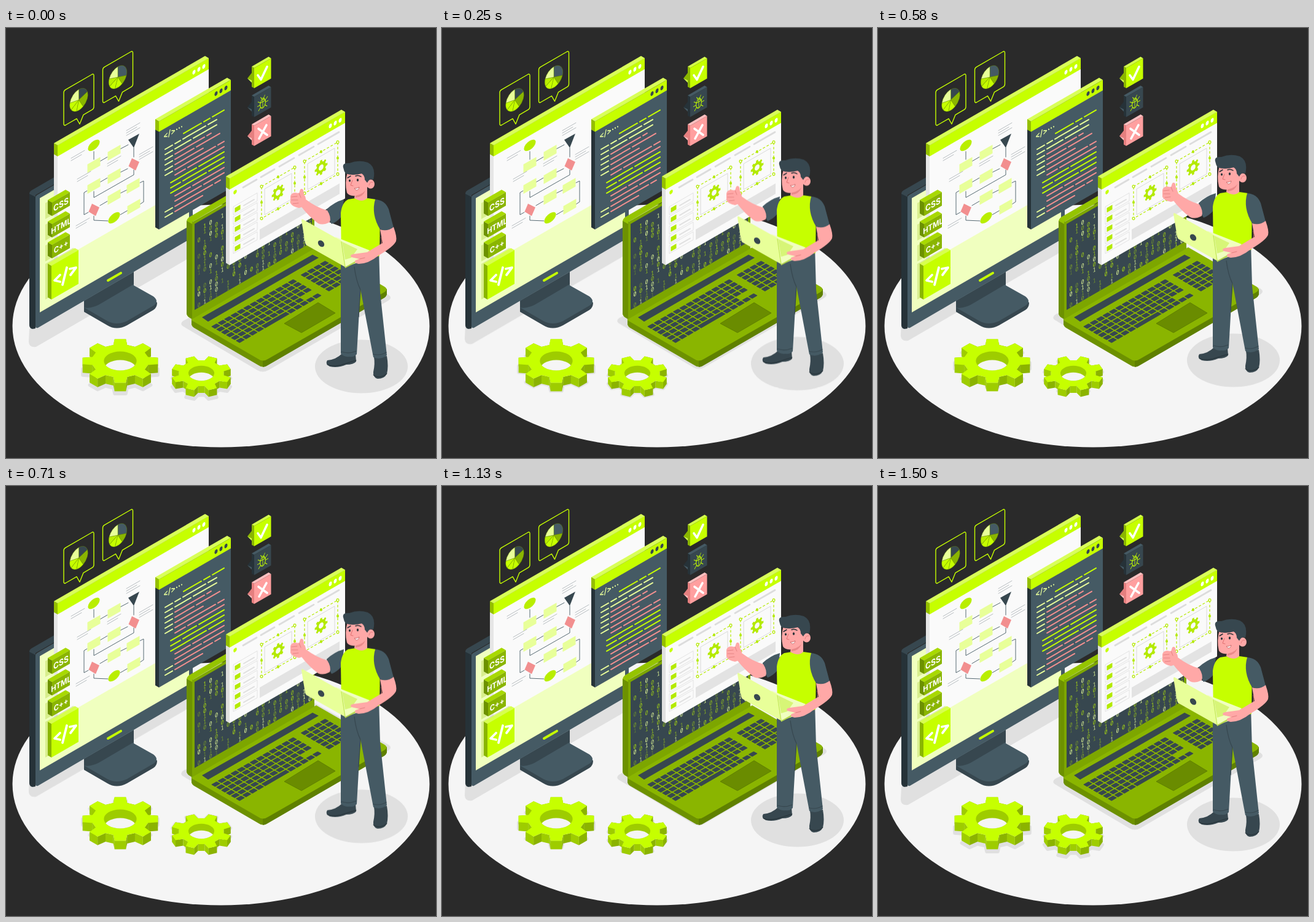
Recreate the animation shown at these times as an HTML page. Size 700x700 px, loop 1.54 s.

```html
<!DOCTYPE html>
<html lang="en">
<head>
<meta charset="utf-8">
<title>Isometric developer scene</title>
<style>
html, body { margin: 0; width: 100%; height: 100%; overflow: hidden; background: #2a2a2a; }
svg { display: block; width: 100%; height: 100%; }
.float { animation: float 1540ms infinite; }
@keyframes float {
  0% { transform: translateY(0); animation-timing-function: steps(18, end); }
  48.7% { transform: translateY(-14px); animation-timing-function: steps(18, end); }
  97.4%, 100% { transform: translateY(0); }
}
text { font-family: Inter, sans-serif; font-weight: 700; text-anchor: middle; }
.bits text { font: 10px "Noto Sans Mono", monospace; }
</style>
</head>
<body>
<svg id="stage" viewBox="0 0 700 700"></svg>
<script>
const K = 0.577;
const LIME = '#c6ff00', OLIVE = '#8ab500', MOSS = '#6d9100', PALE = '#e8ff99', MIST = '#f0ffbf',
  SLATE = '#455a64', DARK = '#37474f', NIGHT = '#263238', SKIN = '#ffa8a7', ROSE = '#f28f8f',
  SHADE = '#e0e0e0', WHITE = '#fafafa';

const poly = (pts, fill, extra = '') => `<polygon points="${pts}" fill="${fill}" ${extra}/>`;
const path = (d, fill, extra = '') => `<path d="${d}" fill="${fill}" ${extra}/>`;
const stroke = (d, color, w = 1, extra = '') =>
  path(d, 'none', `stroke="${color}" stroke-width="${w}" stroke-linecap="round" stroke-linejoin="round" ${extra}`);
const oval = (x, y, rx, ry, fill, extra = '') =>
  `<ellipse cx="${x}" cy="${y}" rx="${rx}" ry="${ry}" fill="${fill}" ${extra}/>`;
const range = (n, fn) => Array.from({ length: n }, (_, i) => fn(i)).join('');

// Shapes on the wall plane, rising to the right
const wall = (x, y, body) => `<g transform="matrix(.866 -.5 0 1 ${x} ${y})">${body}</g>`;
const quad = (x, y, w, h, fill, extra) =>
  poly([x, y, x + w, y - K * w, x + w, y - K * w + h, x, y + h], fill, extra);
const rise = (x, y, w, color, width = 1) => stroke(`M${x} ${y}l${w} ${-K * w}`, color, width);
const slab = (x, y, w, h, d, front, side, top) =>
  poly([x, y, x - d, y - K * d, x - d, y - K * d + h, x, y + h], side) +
  poly([x, y, x + w, y - K * w, x + w - d, y - K * (w + d), x - d, y - K * d], top) +
  quad(x, y, w, h, front);
const label = (x, y, s, size, fill = '#fff') =>
  wall(x, y, `<text font-size="${size}" y="${size * 0.36}" fill="${fill}">${s}</text>`);

function pane(x, y, w, h, bar, face, side, dots) {
  const dot = i => wall(x + w - 8 - i * 8, y + bar * 0.5 - K * (w - 8 - i * 8), oval(0, 0, 2.9, 3.5, dots));
  return slab(x, y, w, h, 6, face, side, '#d9ff59') +
    poly([x, y, x - 6, y - 3.5, x - 6, y + bar - 3.5, x, y + bar], '#95bf00') +
    quad(x, y, w, bar, LIME) + range(3, dot);
}

function cog(cx, cy, r, teeth, turn, squash = K) {
  const pts = [], step = 2 * Math.PI / teeth;
  for (let i = 0; i < teeth; i++) {
    for (const [a, q] of [[-0.31, 0.75], [-0.19, 1], [0.19, 1], [0.31, 0.75]]) {
      const t = turn + (i + a) * step;
      pts.push([cx + r * q * Math.cos(t), cy + r * q * squash * Math.sin(t)]);
    }
  }
  return pts;
}
const shift = (pts, dy) => pts.map(([x, y]) => [x, y + dy]);

function gear(cx, cy, r, depth, turn) {
  const pts = cog(cx, cy, r, 8, turn);
  const sides = pts.map((p, i) => [p, pts[(i + 1) % pts.length]])
    .sort((a, b) => a[0][1] + a[1][1] - b[0][1] - b[1][1])
    .map(([a, b]) => poly([a, b, [b[0], b[1] + depth], [a[0], a[1] + depth]],
      b[1] > a[1] + 1 ? '#8bb300' : '#9ecc00'));
  const rx = r * 0.43, ry = rx * K, id = 'hole' + r;
  return sides.join('') + poly(pts, LIME) +
    `<clipPath id="${id}">${oval(cx, cy, rx, ry, '#000')}</clipPath>` +
    oval(cx, cy, rx, ry, '#9ecc00') +
    oval(cx, cy + depth, rx, ry, '#f5f5f5', `clip-path="url(#${id})"`);
}
const gearShadow = (cx, cy, r, depth, turn) =>
  poly(shift(cog(cx, cy, r, 8, turn), depth + 4), SHADE, `stroke="${SHADE}" stroke-width="5" stroke-linejoin="round"`);

const shadows = () =>
  path('M37 511Q38 521 49 519L304 371V335L38 490Z', SHADE) +
  path('M288 477Q282 482 289 486L409 557Q418 562 427 557L622 444Q630 439 622 434L500 365Z', SHADE) +
  gearShadow(186, 542, 62, 14, 0) + gearShadow(318, 562, 49, 11, Math.PI / 8) +
  oval(578.5, 551, 75.5, 43.5, SHADE);

const stand = () =>
  path('M127 445V462L165 484Q180 493 197 484L240 459Q246 455 246 447L208 420Z', DARK) +
  path('M127 444V455L165 477Q180 485 197 477L240 452Q250 445 240 437L208 419V397Z', SLATE) +
  path('M127 444L208 397V417L157 447Q140 458 127 455Z', DARK);

const monitor = () =>
  path('M38 270Q38 266 42 264L300 115L305 124L48 272V489L43 490Q38 489 38 483Z', DARK) +
  path('M38 270L48 275V489Q38 491 38 482Z', NIGHT) +
  path('M48 276Q48 273 52 271L304 124V341L52 488Q48 489 48 486Z', SLATE) +
  quad(55, 277, 243, 186, MIST) +
  rise(166, 411, 21, LIME, 4);

function bubble(x, y, slices) {
  let at = 0;
  const point = t => `${17 * Math.sin(t)} ${-17 * Math.cos(t)}`;
  const pie = slices.map(([part, fill]) => {
    const a = at, b = at += part * 2 * Math.PI;
    return path(`M0 0L${point(a)}A17 17 0 0 1 ${point(b)}Z`, fill, `stroke="${MOSS}" stroke-width=".4"`);
  }).join('');
  return stroke(`M${x} ${y + 3}q0 -3 3 -4.7l43 -24.8q3 -1.5 3 2v51q0 3 -3 4.7l-14 8.1l-6 15l-5 -8.7l-18 10.4q-3 1.5 -3 -2z`, LIME, 1.4) +
    wall(x + 24.5, y + 15, pie);
}

const flow = () => {
  const box = (x, y) => quad(x - 10.5, y - 1, 21, 14, PALE);
  const note = (x, y, n = 2) => range(n, i => rise(x, y + i * 4, i % 2 ? 17 : 22, '#9aa3a7', 0.7));
  const red = (x, y) => poly([x - 8.5, y + 3, x - 3, y - 10, x + 9, y - 4, x + 3, y + 10], ROSE);
  const wires = ['M143 201V214', 'M153 217L165 210', 'M186 197L199 190', 'M208 195V210', 'M208 231V239L143 276V266',
    'M132 265L127 268V304L134 300', 'M153 251L165 244', 'M186 235L198 229', 'M153 289L165 282', 'M186 269L198 263',
    'M218 252L224 249V283L218 287', 'M143 306V313L166 314', 'M186 304L198 297'];
  return wires.map(d => stroke(d, SLATE, 0.9)).join('') +
    [[143, 223], [176, 203], [143, 257], [176, 241], [207, 257], [176, 275], [208, 291]].map(p => box(...p)).join('') +
    wall(143, 191, oval(0, 0, 11, 7.5, '#b9ee00')) + wall(176, 309, oval(0, 0, 11, 7.5, '#b9ee00')) +
    poly('199,182 217,172 208,195', DARK) + red(208, 222) + red(143, 296) +
    [[106, 212], [196, 167, 3], [116, 246], [217, 206, 3], [114, 322], [165, 221]].map(p => note(...p)).join('');
};

const code = () => {
  const tint = { g: LIME, l: PALE, p: ROSE };
  const rows = ['g289-318 g322-332 g336-355', 'l259-271 l275-284 l288-325 l329-343', 'l259-271 l275-301 l305-343',
    'l259-271 p275-323 p327-334', 'l259-271 p275-306 p310-348', 'l259-271 p275-321', 'l259-271 p275-341 p345-355',
    'p275-292 p296-355', 'g268-310 g314-355', 'g268-284 g288-355', 'g268-326 g330-355', 'p275-300 p304-355',
    'p275-318 p322-355', 'l259-271 p275-336 p340-349', 'l259-271 p275-320'];
  return label(266, 171, '&lt;/&gt;', 13, PALE) +
    range(3, i => oval(278 + i * 4, 165 - i * 2.2, 1, 1.2, PALE)) +
    rows.map((row, i) => row.split(' ').map(s => {
      const [a, b] = s.slice(1).split('-').map(Number);
      return rise(a, 189 + i * 8.5 - (a - 259) * K, b - a, tint[s[0]], 2);
    }).join('')).join('');
};

const tag = (y, s, size) =>
  quad(64, y + 1, 30, 26, '#a9cf30', 'opacity=".35"') +
  slab(75, y, 29, 22, 7, OLIVE, MOSS, '#a8d900') + label(89.5, y + 3, s, size);

const tags = () => tag(284, 'CSS', 14) + tag(319, 'HTML', 13) + tag(353, 'C++', 13) +
  quad(64, 384, 46, 58, '#a9cf30', 'opacity=".35"') +
  slab(74, 387, 44, 55, 6, LIME, OLIVE, '#d7ff4d') +
  stroke('M88 402L79 411L88 413M104 392L114 390L105 402M99 390L92 418', '#fff', 3.8);

const badge = (y, front, side, top, mark) =>
  poly([400, y + 10, 393, y + 19, 400, y + 23], side) + poly([393, y + 19, 404, y + 24, 404, y + 30], top) +
  slab(404, y + 2, 27.5, 33, 4, front, side, top) + mark;

const badges = () =>
  badge(63, LIME, '#8ab500', '#d4ff4d', stroke('M410 77L415 84L425 63', '#fff', 3.6)) +
  badge(110, DARK, NIGHT, SLATE,
    wall(418, 122, oval(0, 1, 5, 7, 'none', `stroke="${LIME}" stroke-width="1.2"`) +
      stroke('M0 -6V8M-5 -2H5M-3 -6Q0 -10 3 -6M-2 -8L-4 -11M2 -8L4 -11M-5 1H-10M5 1H10M-5 -3L-9 -6M5 -3L9 -6M-4 5L-8 9M4 5L8 9', LIME, 1))) +
  badge(157, '#ff9f9f', '#e57f7f', '#ffc0c0', stroke('M411 164L425 174M424 158L412 180', '#fff', 3.6));

function laptop() {
  let seed = 11;
  const rnd = () => (seed = seed * 16807 % 2147483647) / 2147483647;
  const bits = range(20, c => range(15, r => {
    const roll = rnd(), digit = rnd() < 0.55 ? 0 : 1, glow = 0.25 + 0.75 * rnd();
    const x = 314 + c * 9.5;
    return roll < 0.3 ? '' : wall(x, 331 + r * 8.8 - (x - 314) * K,
      `<text fill="${glow > 0.8 ? PALE : LIME}" opacity="${glow.toFixed(2)}">${digit}</text>`);
  }));
  const key = (c, r) => {
    if (c === 13 || (c > 10 && c < 13 && r === 4)) return '';
    if (r === 5 && c > 3 && c < 8) return c === 4 ? '<rect x="48" y="46" width="46.2" height="7.4"/>' : '';
    return `<rect x="${c * 12}" y="${r * 9.2}" width="10.2" height="7.4" rx="1"/>`;
  };
  return path('M302 474V483Q303 486 306 488L411 549Q418 554 426 549L616 439Q620 436 620 432V425L505 362Z', MOSS) +
    path('M418 541L620 425V432Q620 436 616 439L426 549Q422 552 418 552Z', '#5f8000') +
    path('M303 472L505 357L616 421Q623 425 616 430L426 539Q418 544 411 539L304 477Q300 475 303 472Z', OLIVE) +
    path('M294 316Q294 311 298 308L497 193L503 198L303 316V474L298 471Q294 468 294 464Z', '#95c400') +
    path('M294 314L303 319V474L298 471Q294 468 294 464Z', MOSS) +
    quad(303, 316, 199, 158, '#7da600') +
    quad(307, 319, 191, 140, DARK) + `<g class="bits">${bits}</g>` +
    poly('319,471 329,478 509,374 499,369', DARK) +
    `<g fill="${DARK}" transform="matrix(.866 -.5 .866 .5 334 486)">${range(6, r => range(18, c => key(c, r)))}</g>` +
    poly('453,481 481,496 536,464 508,447', '#6a8c00', 'stroke="#5f8000"');
}

const preview = () => {
  const frame = (x, y) => {
    const w = 54, h = 52, top = y - K * w;
    const corners = [[x, y], [x + w, top], [x, y + h], [x + w, top + h]];
    const mids = [[x, y + h / 2], [x + w, top + h / 2], [x + w / 2, y - K * w / 2], [x + w / 2, y - K * w / 2 + h]];
    return quad(x + 5, y + 4, w - 10, h - 10, 'none', 'stroke="#d6d6d6" stroke-width=".9"') +
      quad(x, y, w, h, 'none', 'stroke="#b4ea00" stroke-width="1.2" stroke-dasharray="4 3"') +
      corners.map(([a, b]) => oval(a, b, 1.9, 2.2, WHITE, 'stroke="#b4ea00" stroke-width="1.2"')).join('') +
      mids.map(([a, b]) => oval(a, b, 2, 2.4, '#b4ea00')).join('') +
      wall(x + 27, y + 10, poly(cog(0, 0, 12, 8, 0, 1), '#b4ea00') + oval(0, 0, 4.5, 4.5, WHITE));
  };
  const item = i => quad(370, 291 + i * 15.8, 39, 13, 'none', 'stroke="#dedede" stroke-width=".8"') +
    quad(372.5, 293 + i * 15.8, 9, 7.5, '#b4ea00') + rise(387, 289 + i * 15.8, 17, '#e0e0e0', 2);
  const menu = [[386, 22], [415, 22], [445, 24], [477, 24], [508, 34]]
    .map(([x, w]) => rise(x, 267 - (x - 373) * K, w, '#dcdcdc', 2.8)).join('');
  return wall(373, 267, oval(0, 0, 3.2, 3.2, LIME)) + menu + range(5, item) +
    quad(413, 328, 130, 17, '#e3e3e3') + frame(416, 258) + frame(486, 217);
};

const person = () =>
  path('M547 530H569L570 543Q566 548 554 548Q540 554 527 551Q519 547 523 541Q537 540 547 530Z', DARK) +
  path('M599 536L620 534Q623 551 620 563Q616 571 605 571Q597 569 598 560Q601 546 599 536Z', DARK) +
  stroke('M523 548Q535 553 553 546L570 541M598 565Q608 572 620 563', NIGHT, 1) +
  path('M545 365L545 530Q550 536 559 535Q567 536 571 531L577 425L590 365Z', SLATE) +
  path('M562 365L577 425L598 536Q609 541 620 533L609 430L607 360Z', SLATE) +
  stroke('M567 389Q570 412 577 426L574 470M546 527Q558 531 570 526M598 531Q609 534 619 528', DARK, 1.2) +
  path('M550 279Q535 283 522 295Q522 307 530 319Q540 315 547 306Z', SLATE) +
  path('M480 290L488 279Q505 292 523 297Q530 308 527 316Q516 322 508 318Q493 307 480 290Z', SKIN) +
  path('M463 274Q464 269 470 268L477 269L479 263Q482 260 484 264L485 271Q490 277 487 284Q484 292 477 293Q466 291 463 285Z', SKIN) +
  stroke('M465 275L474 274M465 280L475 280M467 286L476 285M477 269L480 276', '#e27f7f', 0.9) +
  path('M557 279Q578 274 602 279L609 305L608 371Q577 379 546 372L545 301Q547 284 557 279Z', LIME) +
  path('M569 264L588 254V277Q580 285 567 277Z', SKIN) +
  path('M569 271Q579 271 585 264Q582 275 569 276Z', '#e98989') +
  path('M556 234Q551 253 555 268Q558 274 569 273Q584 270 589 258L594 238L575 227Z', SKIN) +
  oval(593.5, 254, 6.5, 7.5, SKIN) + stroke('M591 256Q592 250 597 251', '#e27f7f', 1) +
  path('M549 227Q547 219 559 220Q574 214 589 219Q603 226 598 247Q592 244 588 252L584 247Q584 240 579 237Q564 241 553 237Q550 233 549 227Z', DARK) +
  stroke('M556 244L561 241M569 241Q574 239 578 242', NIGHT, 1.5) +
  oval(559.5, 248.5, 1.5, 2.1, NIGHT) + oval(572.5, 247.5, 1.6, 2.2, NIGHT) +
  stroke('M564 248L561 256L565 257', '#e06f6f', 1) +
  path('M567 261Q571 262 575 259Q574 264 570 264Z', '#fff', 'stroke="#b84f4f" stroke-width=".7"') +
  path('M601 279Q617 280 623 295L631 325Q621 332 609 328Q594 303 601 279Z', SLATE) +
  poly('536,340 592,362 575,381 552,389', MIST) +
  poly('547,348 572,360 562,374 552,377', '#d7f577') +
  poly('552,389 577,375 577,378 552,391', '#b4d64a') +
  path('M481 313Q481 310 484 312L543 345Q546 346 546 349L552 389L490 354Q488 353 487 350Z', PALE) +
  stroke('M546 348L552 389', '#c5e95a', 1.4) +
  oval(513, 351, 4.4, 6, DARK, 'transform="rotate(-42 513 351)"') +
  path('M609 328Q621 332 631 324Q637 341 635 347Q631 356 607 370Q590 384 574 384Q565 382 569 378L575 376L562 373Q559 369 566 368L588 365Q601 357 613 350Z', SKIN) +
  stroke('M576 376L584 374M611 341Q613 347 611 351', '#e27f7f', 1);

const float = body => `<g class="float">${body}</g>`;

document.getElementById('stage').innerHTML = [
  oval(350, 485, 339.5, 197.5, '#f5f5f5'),
  float(shadows()),
  stand(), monitor(),
  bubble(94, 102, [[0.2, DARK], [0.22, OLIVE], [0.12, LIME], [0.12, LIME], [0.12, LIME], [0.22, PALE]]),
  bubble(157.5, 65, [[0.3, SLATE], [0.12, OLIVE], [0.13, LIME], [0.13, LIME], [0.12, '#b9ee00'], [0.2, PALE]]),
  pane(84, 191, 246, 189, 18, WHITE, '#e6e6e6', '#fff'), flow(),
  pane(249, 152, 117, 176, 17, SLATE, NIGHT, DARK), code(),
  tags(), badges(), laptop(),
  pane(364, 245, 188, 141, 18, WHITE, '#e0e0e0', '#fff'), preview(),
  gear(186, 542, 62, 14, 0), gear(318, 562, 49, 11, Math.PI / 8),
  float(person())
].join('');
</script>
</body>
</html>
```
